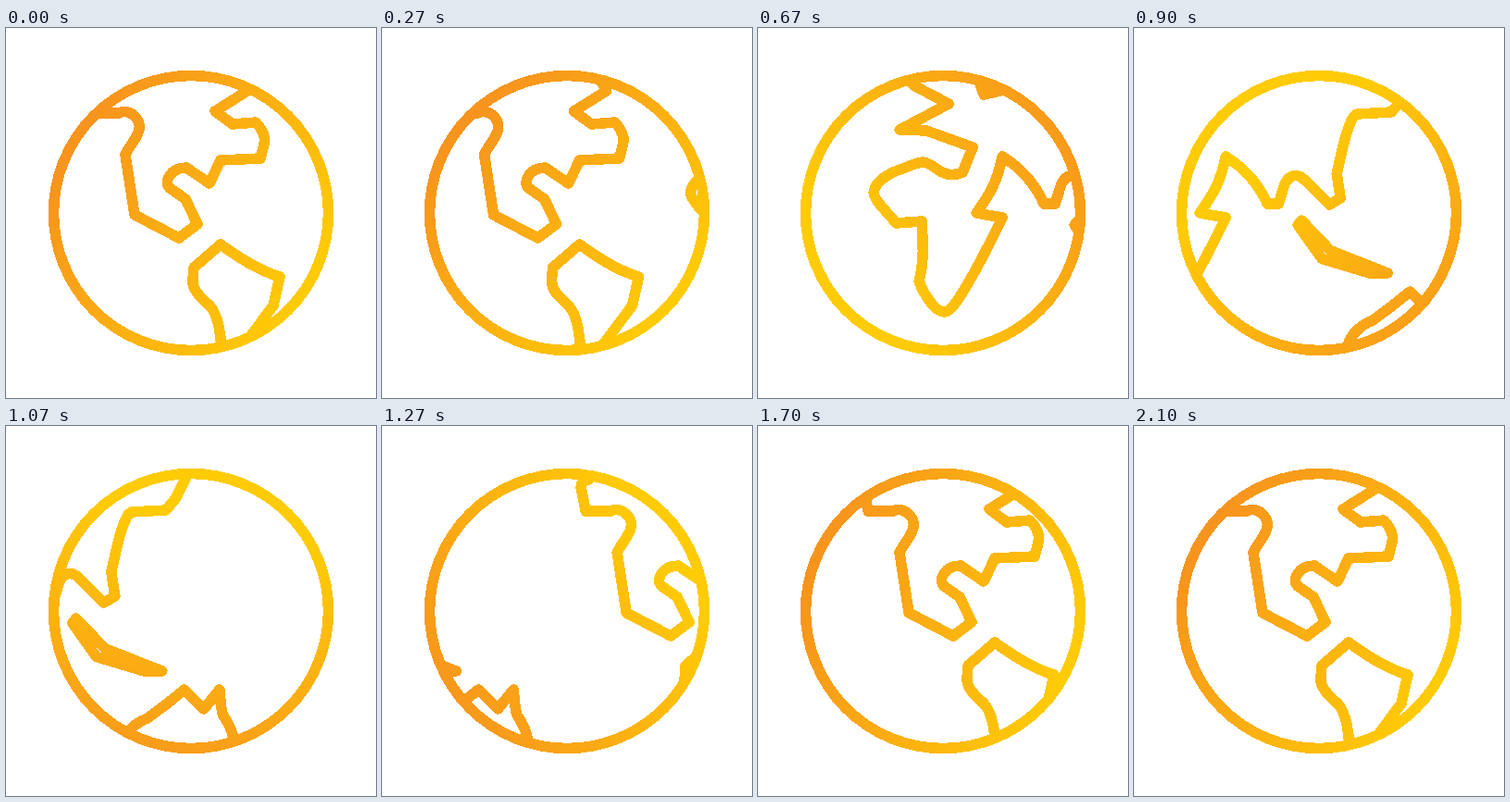
An HTML page that plays this animation: 400 px wide and 400 px high, repeating every 2120 ms.

```html
<!DOCTYPE html>
<html lang="en">
<head>
<meta charset="utf-8">
<title>Spinning globe</title>
<style>
  html, body { margin: 0; width: 100%; height: 100%; overflow: hidden; background: #fff; }
  svg { display: block; width: 100vw; height: 100vh; shape-rendering: crispEdges; }
</style>
</head>
<body>
<svg viewBox="0 0 400 400">
  <defs>
    <linearGradient id="shade" gradientUnits="userSpaceOnUse">
      <stop offset="0" stop-color="#f7941d"/>
      <stop offset="1" stop-color="#ffcb05"/>
    </linearGradient>
    <clipPath id="disc"><circle cx="200" cy="200" r="150"/></clipPath>
    <g id="land">
      <!-- North America -->
      <path d="M97 48 L98 58 Q89 60 90 67 L95 92 H122 C134 86 146 99 144 109
        C143 118 134 126 129 137 L139 202 L187 227 L207 212 L194 185 L177 173
        C170 166 178 151 195 151 L220 168 L232 143 L275 141 C277 133 280 125 279.500 119
        C278 111 273 105 270 102 L245 104 L226 90 L261 68 L255 57 V48"/>
      <!-- Greenland -->
      <path d="M300 48 L304 62 L310 62 L314 48"/>
      <!-- South America -->
      <path d="M233 354 C233 335 230 310 220 300 C208 289 201 282 202 272 L203 259
        L232 234 C250 247 272 262 296 269 L289 300 L251 351"/>
      <!-- Europe, Africa and Asia -->
      <g transform="translate(227)">
        <path d="M160 48 L168 62 L206 82 L153 110 L182 111 L232 129 L221 156
          C212 160 205 159 199 156 C191 152 187 146 178 145 C169 146 164 149 159 151
          C146 155 126 164 125 178
          C126 188 141 200 149 211 L177 209 C178 235 180 250 174 274
          C180 290 192 307 201 307 C207 307 212 299 215 295 C232 270 248 238 264 205
          L236 200 C250 180 258 168 264 139 C285 152 300 170 309 190 H321
          L328 168 C333 159 341 156 350 165 L376 191 L388 184 L384 158
          C388 140 392 120 396 110 C399 102 401 95 406 93 L443 91 L453 79 L469 48"/>
        <path d="M236 50 L244 72 L270 66 L285 48"/>
      </g>
      <!-- Indonesia and Australia -->
      <g transform="translate(392)">
        <path d="M181 208 L177 213 L203 249.500 L256 265.500 L274 265 L212 240.500 Z"/>
        <path d="M229 352 C231 336 240 323 258 316 C272 306 285 296 298 285 L319 306
          L336 285 C337 294 337 305 340 313 C346 322 351 330 353 350"/>
      </g>
    </g>
    <mask id="lines" maskUnits="userSpaceOnUse" x="0" y="0" width="400" height="400">
      <g fill="none" stroke="#fff" stroke-width="11.5" stroke-linecap="round" stroke-linejoin="round">
        <g clip-path="url(#disc)">
          <g id="map">
            <use href="#land"/>
            <use href="#land" x="711"/>
          </g>
        </g>
        <circle cx="200" cy="200" r="148.5"/>
      </g>
    </mask>
  </defs>
  <rect width="400" height="400" fill="url(#shade)" mask="url(#lines)"/>
</svg>
<script>
  const LOOP = 2120, STEP = 25, DELAY = 100, SPIN = 1994;
  const MAP_WIDTH = 711;
  const PIVOT = { x: 225, y: 225 }, START_ANGLE = -148;
  const ORANGE_REACH = 180, YELLOW_REACH = 115;
  const map = document.getElementById('map');
  const shade = document.getElementById('shade');

  // cubic-bezier(1/3, 0, 1/3, 1): x = s - s² + s³, y = 3s² - 2s³
  function ease(x) {
    let low = 0, high = 1;
    for (let i = 0; i < 30; i++) {
      const s = (low + high) / 2;
      if (s - s * s + s * s * s < x) low = s; else high = s;
    }
    return low * low * (3 - 2 * low);
  }

  function aimGradient(degrees) {
    const angle = degrees * Math.PI / 180;
    const dx = Math.cos(angle), dy = Math.sin(angle);
    shade.setAttribute('x1', PIVOT.x + ORANGE_REACH * dx);
    shade.setAttribute('y1', PIVOT.y + ORANGE_REACH * dy);
    shade.setAttribute('x2', PIVOT.x - YELLOW_REACH * dx);
    shade.setAttribute('y2', PIVOT.y - YELLOW_REACH * dy);
  }

  function render(ms) {
    const time = Math.floor((ms % LOOP + 5) / STEP) * STEP;
    const x = Math.min(1, Math.max(0, (time - DELAY) / SPIN));
    const turn = x === 0 || x === 1 ? x : ease(x);
    map.setAttribute('transform', `translate(${-MAP_WIDTH * turn})`);
    aimGradient(START_ANGLE + 360 * turn);
  }

  let start;
  function tick(now) {
    start ??= now;
    render(now - start);
    requestAnimationFrame(tick);
  }
  render(0);
  requestAnimationFrame(tick);
</script>
</body>
</html>
```
